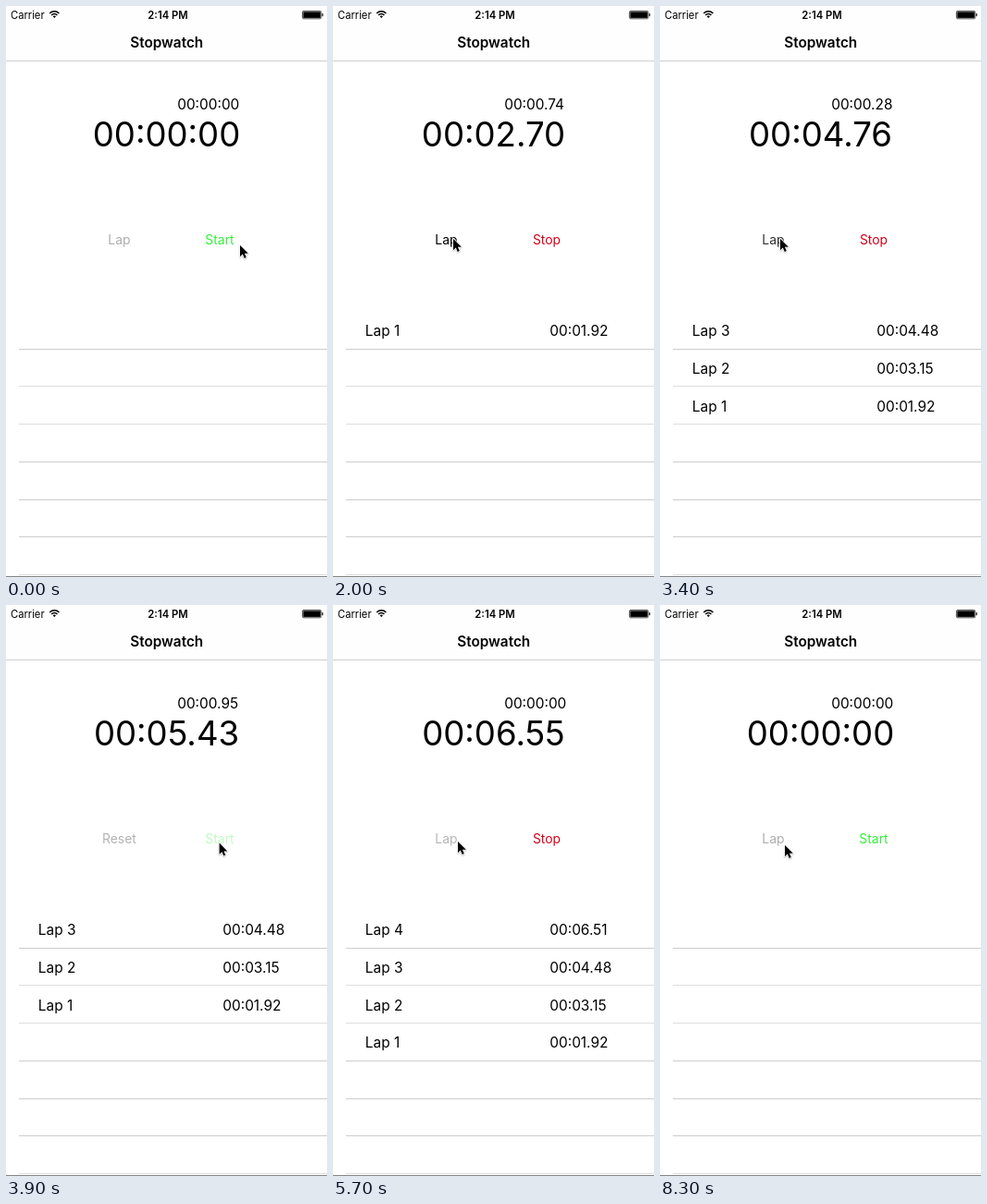
Write an HTML page with a canvas that moves like this. It is 347 by 618 pixels and loops after 8400 ms.

```html
<!DOCTYPE html>
<html lang="en">
<head>
<meta charset="utf-8">
<title>Stopwatch</title>
<style>
  html, body { margin: 0; width: 100%; height: 100%; overflow: hidden; background: #fff; }
  canvas { display: block; width: 347px; height: 618px; }
</style>
</head>
<body>
<canvas id="stage"></canvas>
<script>
const W = 347, H = 618, LOOP = 8400, STEP = 100;
const RATE = 1.4714; // stopwatch seconds per second of playback
const ROW_H = 40.75, FIRST_LINE = 371;
const BLACK = '#000', GREEN = '#35ee3c', RED = '#d0021b', GRAY = '#adadad';

const canvas = document.getElementById('stage');
const ctx = canvas.getContext('2d');
const dpr = window.devicePixelRatio || 1;
canvas.width = W * dpr;
canvas.height = H * dpr;

const runs = [
  { start: 165, stop: 3855, base: 0, end: 5.43 },
  { start: 4939, stop: 6624, base: 5.43, end: 7.91 }
];
const RESET_AT = 7950;

// value: time listed in the row; from: where the next lap's clock begins
const laps = [
  { at: 1470, value: 1.92, from: 1.96 },
  { at: 2306, value: 3.15, from: 3.17 },
  { at: 3211, value: 4.48, from: 4.48 },
  { at: 5672, value: 6.51, from: 6.55 }
];

const cursorPath = [
  [0, 253, 259], [200, 253, 259], [600, 252, 267], [850, 248, 266],
  [1300, 131, 253], [1450, 130, 252], [3420, 130, 252], [3780, 231, 257],
  [4200, 229, 260], [4800, 225, 259], [4960, 225, 261], [5130, 224, 266],
  [5520, 135, 256], [6150, 135, 256], [6500, 240, 261], [6840, 241, 261],
  [7200, 135, 260], [LOOP, 135, 260]
];

const clamp01 = x => Math.max(0, Math.min(1, x));
const smooth = x => x * x * (3 - 2 * x);
const mix = (a, b, k) => a + (b - a) * k;

function clock(seconds) {
  const n = Math.round(seconds * 100);
  if (n <= 0) return '00:00:00';
  const two = v => String(v).padStart(2, '0');
  return `${two(Math.floor(n / 6000))}:${two(Math.floor(n / 100) % 60)}.${two(n % 100)}`;
}

function elapsed(t) {
  if (t >= RESET_AT) return 0;
  let total = 0;
  for (const r of runs) {
    if (t >= r.stop) total = r.end;
    else if (t >= r.start) total = r.base + (t - r.start) * RATE / 1000;
  }
  return total;
}

function cursorAt(t) {
  const i = cursorPath.findIndex(p => p[0] > t);
  const [t0, x0, y0] = cursorPath[i - 1], [t1, x1, y1] = cursorPath[i];
  const k = smooth((t - t0) / (t1 - t0));
  return [mix(x0, x1, k), mix(y0, y1, k)];
}

// Buttons dim while held and fade back after release.
function buttonAlpha(t, clicks, recovery, hold = 70) {
  let alpha = 1;
  for (const at of clicks) {
    if (t >= at - hold && t < at) alpha = 0.2;
    else if (t >= at && t < at + recovery) alpha = mix(0.2, 1, (t - at) / recovery);
  }
  return alpha;
}

function text(str, x, y, size, { color = BLACK, align = 'left', weight = 400, alpha = 1 } = {}) {
  ctx.font = `${weight} ${size}px Inter, Roboto, sans-serif`;
  ctx.textAlign = align;
  ctx.fillStyle = color;
  ctx.globalAlpha = alpha;
  ctx.fillText(str, x, y);
  ctx.globalAlpha = 1;
}

function rect(x, y, w, h, color) {
  ctx.fillStyle = color;
  ctx.fillRect(x, y, w, h);
}

function drawWifi(x, y) {
  ctx.strokeStyle = ctx.fillStyle = BLACK;
  ctx.lineWidth = 1.5;
  for (const r of [4.4, 7.2]) {
    ctx.beginPath();
    ctx.arc(x, y, r, -Math.PI * 0.75, -Math.PI * 0.25);
    ctx.stroke();
  }
  ctx.beginPath();
  ctx.moveTo(x, y);
  ctx.arc(x, y, 2.4, -Math.PI * 0.75, -Math.PI * 0.25);
  ctx.fill();
}

function drawBattery() {
  ctx.strokeStyle = BLACK;
  ctx.lineWidth = 0.7;
  ctx.beginPath();
  ctx.roundRect(320.4, 5.4, 20.4, 8.4, 1.5);
  ctx.stroke();
  rect(321.3, 6.3, 18.6, 6.6, BLACK);
  rect(341.6, 8.1, 1.1, 3, BLACK);
}

function drawChrome() {
  rect(0, 0, W, H, '#fff');
  rect(0, 0, W, 59, '#fefefe');
  rect(0, 59, W, 1, '#cfcfcf');
  text('Carrier', 5, 13.5, 11.2);
  drawWifi(52.3, 13);
  text('2:14 PM', 175, 13.5, 11.3, { align: 'center', weight: 600 });
  drawBattery();
  text('Stopwatch', 173.7, 44.6, 15.3, { align: 'center', weight: 600 });
  for (let i = 0; i < 7; i++) {
    const faint = i === 1 || i === 2 || i === 6;
    rect(14, Math.floor(FIRST_LINE + i * ROW_H), W - 14, 1, faint ? '#dedede' : '#cdcdcd');
  }
  rect(0, 617, W, 1, '#858585');
}

function drawButtons(t, total) {
  const running = runs.some(r => t >= r.start && t < r.stop);
  const toggles = runs.flatMap(r => [r.start, r.stop]);
  const stopped = !running && total > 0;
  const lapAlpha = buttonAlpha(t, laps.map(l => l.at), 250);
  const toggleAlpha = buttonAlpha(t, toggles, 350);
  const swapAlpha = buttonAlpha(t, toggles, 350, 0);
  const resetAlpha = buttonAlpha(t, [RESET_AT], 350);
  text(stopped ? 'Reset' : 'Lap', 122.4, 258, 13.9, {
    color: total > 0 || running ? BLACK : GRAY,
    align: 'center',
    alpha: Math.min(lapAlpha, swapAlpha, resetAlpha)
  });
  text(running ? 'Stop' : 'Start', 231, 258, 13.9, {
    color: running ? RED : GREEN, align: 'center', alpha: toggleAlpha
  });
}

function drawCursor([x, y]) {
  ctx.save();
  ctx.translate(x, y);
  ctx.beginPath();
  ctx.moveTo(0, 0);
  for (const [px, py] of [[0, 12.2], [2.8, 9.6], [4.7, 14], [6.8, 13.1], [4.9, 8.8], [8.8, 8.8]]) {
    ctx.lineTo(px, py);
  }
  ctx.closePath();
  ctx.shadowColor = 'rgba(0,0,0,0.3)';
  ctx.shadowBlur = 1.5 * dpr;
  ctx.shadowOffsetY = 0.7 * dpr;
  ctx.lineJoin = 'round';
  ctx.lineWidth = 1.5;
  ctx.strokeStyle = '#fff';
  ctx.stroke();
  ctx.shadowColor = 'transparent';
  ctx.fillStyle = BLACK;
  ctx.fill();
  ctx.restore();
}

function draw(t) {
  ctx.setTransform(dpr, 0, 0, dpr, 0, 0);
  const total = elapsed(t);
  const done = t < RESET_AT ? laps.filter(l => t >= l.at) : [];
  const lapStart = done.length ? done[done.length - 1].from : 0;

  drawChrome();
  text(clock(total - lapStart), 185.2, 111.8, 15.4);
  text(clock(total), 173.5, 152.4, 36.6, { align: 'center' });
  drawButtons(t, total);
  done.forEach((lap, i) => {
    const y = 357 + (done.length - 1 - i) * ROW_H;
    text(`Lap ${i + 1}`, 34.8, y, 15.4);
    text(clock(lap.value), 234.3, y, 15.4);
  });
  drawCursor(cursorAt(t));
}

function tick() {
  const t = performance.now() % LOOP;
  draw(Math.floor(t / STEP) * STEP);
  requestAnimationFrame(tick);
}
tick();
</script>
</body>
</html>
```
